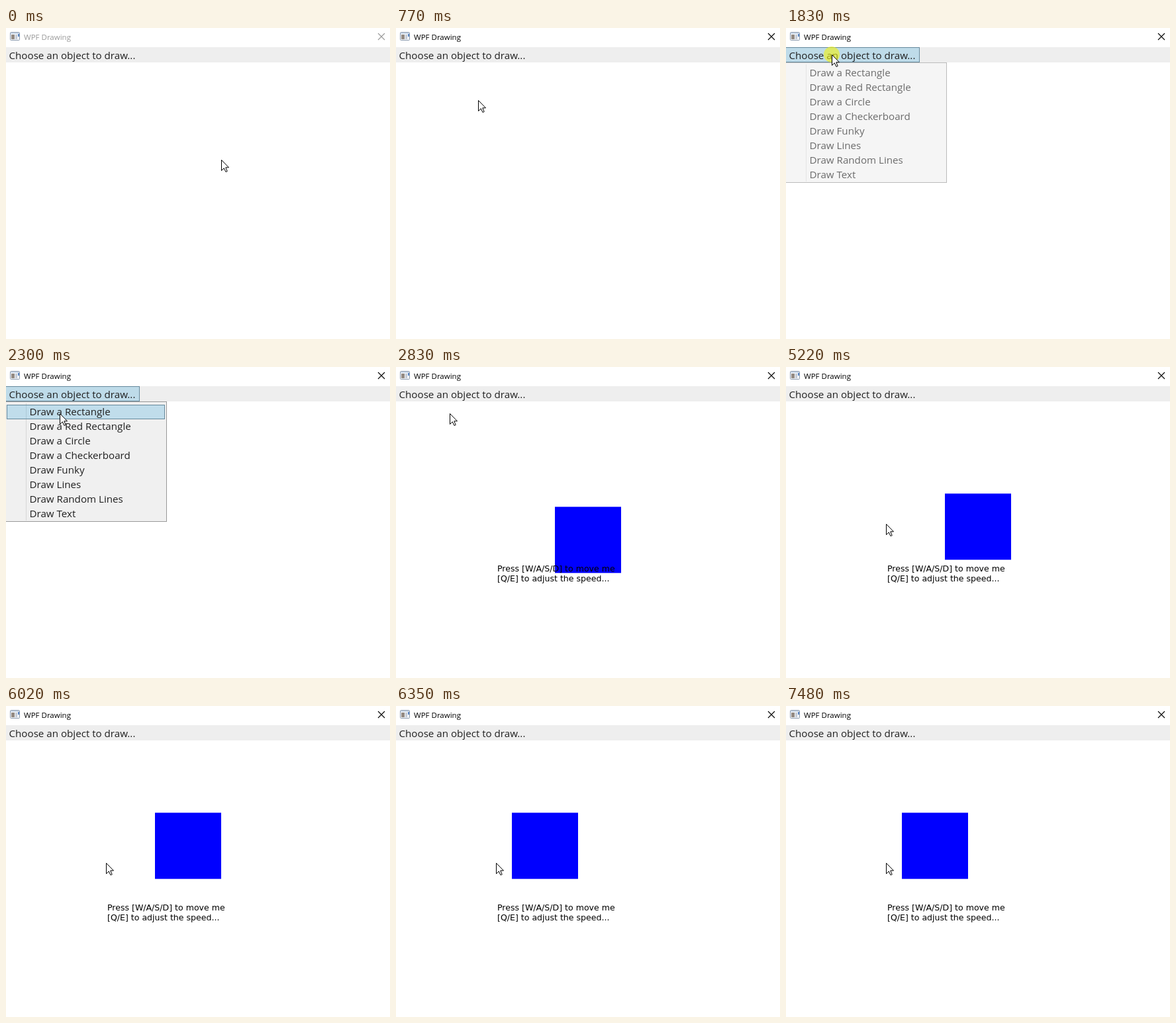
An HTML page for the animation above (8000 ms loop, 580 by 470 pixels).

```html
<!DOCTYPE html>
<html lang="en">
<head>
<meta charset="utf-8">
<title>Drawing</title>
<style>
  html, body { margin: 0; width: 100%; height: 100%; overflow: hidden; background: #fff; }
  svg { display: block; }
  text { white-space: pre; }
  .ui { font: 15.15px "Open Sans", "Noto Sans", sans-serif; fill: #212121; }
  #title { font: 11.5px "Open Sans", "Noto Sans", sans-serif; }
  .hint { font: 12.55px "DejaVu Sans", sans-serif; }
  .hot { fill: #26a0da; fill-opacity: .24; stroke: #65899c; }
</style>
</head>
<body>
<svg width="580" height="470" viewBox="0 0 580 470">
  <rect width="580" height="470" fill="#fff"/>
  <g id="icon">
    <rect x="6.5" y="6.5" width="14" height="12" rx="1" fill="#f4f6f9" stroke="#8c9bae"/>
    <rect x="7" y="7" width="13" height="2" fill="#cbd8e8"/>
    <rect x="8" y="10" width="5" height="7" fill="#938a82"/>
    <rect x="14" y="10" width="3" height="7" fill="#c3cbd6"/>
    <rect x="18" y="9" width="2" height="4" fill="#5b86c4"/>
  </g>
  <text id="title" x="27" y="18">WPF Drawing</text>
  <path id="close" d="M562 8l10 10m0-10l-10 10" fill="none" stroke-width="1.1"/>
  <rect y="29" width="580" height="23" fill="#eee"/>
  <rect id="header" class="hot" x="-2.5" y="29.5" width="204" height="22"/>
  <text class="ui" x="4.5" y="47">Choose an object to draw...</text>
  <g id="scene">
    <rect id="box" y=".3" width="100" height="100" fill="#00f"/>
    <text class="hint" x="153" y="309">Press [W/A/S/D] to move me</text>
    <text class="hint" x="153" y="324">[Q/E] to adjust the speed...</text>
  </g>
  <g id="menu">
    <rect x="-2.5" y="52.5" width="245" height="181" fill="#f0f0f0" stroke="#999"/>
    <path d="M30.5 55V232" stroke="#d7d7d7"/>
    <rect id="item" class="hot" x="1.5" y="57.5" width="238" height="21"/>
  </g>
  <circle id="click" r="12" fill="#f1f10f" fill-opacity=".6"/>
  <path id="cursor" d="M.5.5V16.5L4.3 12.8L7 18.5L9.2 17.5L6.8 11.8H11.5Z"
    fill="#fff" stroke="#000" stroke-linejoin="round"/>
</svg>
<script>
const LOOP = 8000;
const TICK = 66.4, PHASE = 36;            // the screen refreshes about 15 times a second
const KEY_DELAY = 490, KEY_RATE = 33.2, STRIDE = 5;
const OPEN = 1700, CLOSE = 2830;
const $ = id => document.getElementById(id);

const items = ["a Rectangle", "a Red Rectangle", "a Circle", "a Checkerboard",
  "Funky", "Lines", "Random Lines", "Text"];
items.forEach((name, i) => {
  const t = document.createElementNS("http://www.w3.org/2000/svg", "text");
  t.setAttribute("class", "ui");
  t.setAttribute("x", 35.5);
  t.setAttribute("y", 73 + 22 * i);
  t.textContent = "Draw " + name;
  $("menu").append(t);
});

const clamp = (v, lo, hi) => Math.min(hi, Math.max(lo, v));
const smooth = u => u * u * (3 - 2 * u);
const slow = u => u * (2 - u);

const home = [325, 199];
const moves = [
  { from: 0, to: 135, goal: [313, 207], ease: slow },
  { from: 400, to: 766, goal: [124, 109], ease: smooth },
  { from: 766, to: 1490, goal: [69, 40], ease: slow },
  { from: 2030, to: 2290, goal: [81, 70], ease: smooth },
  { from: 3630, to: 4150, goal: [141, 222], ease: smooth },
  { from: 4150, to: 4490, goal: [151, 237], ease: slow }
];
const clicks = [[200, 400], [OPEN, 1900], [2630, CLOSE], [4560, 4690]];
const keys = [
  { down: 4640, dx: 0, dy: -1, count: 10 },
  { down: 5470, dx: -1, dy: 0, count: 14 },
  { down: 7440, dx: 1, dy: 0, count: 1 }
];

function pointerAt(t) {
  return moves.reduce((pos, { from, to, goal, ease }) => {
    const u = ease(clamp((t - from) / (to - from), 0, 1));
    return pos.map((p, i) => p + (goal[i] - p) * u);
  }, home).map(Math.round);
}

// A held key acts once, pauses, then repeats.
function strokes({ down, count }, t) {
  if (t < down) return 0;
  const repeats = Math.floor((t - down - KEY_DELAY) / KEY_RATE) + 1;
  return clamp(1 + Math.max(0, repeats), 0, count);
}

function squareAt(t) {
  return keys.reduce(([x, y], key) => {
    const d = STRIDE * strokes(key, t);
    return [x + key.dx * d, y + key.dy * d];
  }, [240, 211]);
}

const show = (id, on) => $(id).setAttribute("visibility", on ? "visible" : "hidden");
const place = (id, [x, y]) => $(id).setAttribute("transform", `translate(${x} ${y})`);

function draw(t) {
  const seen = Math.max(0, PHASE + Math.floor((t - PHASE) / TICK) * TICK);
  const tip = pointerAt(seen);
  const open = t >= OPEN && t < CLOSE;
  place("cursor", tip);
  place("click", tip);
  place("box", squareAt(seen));
  show("click", clicks.some(([on, off]) => t >= on && t < off));
  show("header", open || tip[1] < 52);
  show("item", open && tip[1] >= 57);
  show("scene", t >= CLOSE);
  $("menu").setAttribute("opacity", open ? clamp((seen - OPEN) / 195, 0, 1) : 0);
  const ink = t < 270 ? "#999" : "#000";
  $("title").setAttribute("fill", ink);
  $("close").setAttribute("stroke", ink);
}

const start = performance.now();
function tick() {
  draw((performance.now() - start) % LOOP);
  requestAnimationFrame(tick);
}
tick();
</script>
</body>
</html>
```
